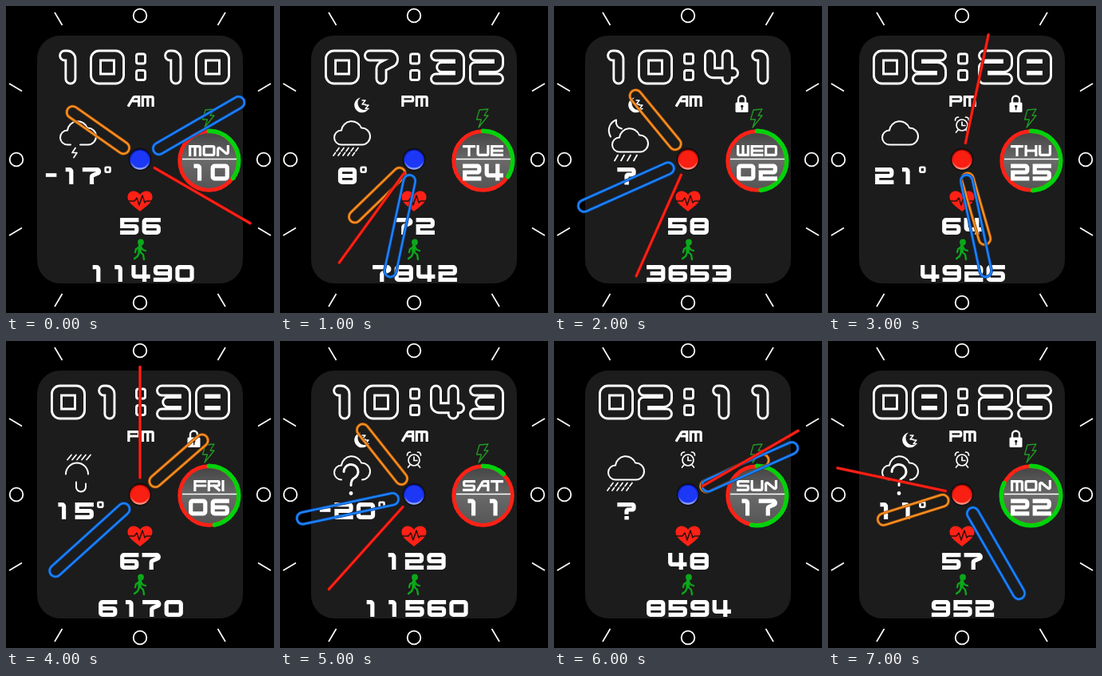
Write an HTML page with a canvas that moves like this. It is 336 px wide and 384 px high and loops after 8 s.

```html
<!DOCTYPE html>
<html lang="en">
<head>
<meta charset="utf-8">
<title>Watch face</title>
<style>
html, body { margin: 0; width: 100%; height: 100%; overflow: hidden; background: #000; }
canvas { display: block; width: 336px; height: 384px; }
</style>
</head>
<body>
<canvas id="face" width="336" height="384" role="img"></canvas>
<script>
const canvas = document.getElementById('face');
const ctx = canvas.getContext('2d');
const WHITE = '#fff', PANEL = '#1c1c1c', RED = '#ff2116', GREEN = '#00d20c';
const CX = 168, CY = 192, TAU = Math.PI * 2;

// Each state lasts one second.
const states = [
  { time: '10:10:20', half: 'AM', day: 'MON', date: '10', pulse: '56', steps: '11490', temp: '-17°', sky: 'thunder', icons: '', charge: 35 },
  { time: '07:32:36', half: 'PM', day: 'TUE', date: '24', pulse: '72', steps: '7842', temp: '8°', sky: 'rain', icons: 'moon', charge: 34 },
  { time: '10:41:34', half: 'AM', day: 'WED', date: '02', pulse: '58', steps: '3653', temp: '?', sky: 'night', icons: 'moon lock', charge: 48 },
  { time: '05:28:02', half: 'PM', day: 'THU', date: '25', pulse: '64', steps: '4926', temp: '21°', sky: 'cloud', icons: 'alarm lock', charge: 49 },
  { time: '01:38:00', half: 'PM', day: 'FRI', date: '06', pulse: '67', steps: '6170', temp: '15°', sky: 'umbrella', icons: 'lock', charge: 47 },
  { time: '10:43:37', half: 'AM', day: 'SAT', date: '11', pulse: '129', steps: '11560', temp: '-20°', sky: 'unknown', icons: 'moon alarm', charge: 12 },
  { time: '02:11:10', half: 'AM', day: 'SUN', date: '17', pulse: '48', steps: '8594', temp: '?', sky: 'rain', icons: 'alarm', charge: 53 },
  { time: '08:25:47', half: 'PM', day: 'MON', date: '22', pulse: '57', steps: '952', temp: '11°', sky: 'unknown', icons: 'moon alarm lock', charge: 82 }
];

// Strokes on a 5 x 5 lattice lettered a..y, row by row; capitals are sharp corners.
const glyphs = {
  0: 'aeyua', 1: 'bcw', 2: 'aeoKUy', 3: 'aeyu lo', 4: 'apt dx', 5: 'eAKoyu',
  6: 'eauyoK', 7: 'aejmw', 8: 'aeyua ko', 9: 'Okaeyu', '?': 'aeomr',
  A: 'ucEy mo', D: 'AeyUA', E: 'eAUy ko', F: 'eAu ko', H: 'au ey ko', I: 'cw',
  M: 'uAey cw', N: 'uaye', O: 'aeyua', P: 'uAeok', R: 'uAeok my', S: 'eakoyu',
  T: 'ae cw', U: 'auye', W: 'auYe cw', '°': 'aeyua'
};

function glyphPath(ch, x, y, w, h, weight) {
  const path = new Path2D();
  const iw = w - weight, ih = h - weight;
  const shift = ch === '1' ? iw * 0.1 : 0;
  const radius = Math.min(weight * 0.5, ih / 7);
  for (const stroke of glyphs[ch].split(' ')) {
    const pts = [...stroke].map(c => {
      const i = c.toLowerCase().charCodeAt(0) - 97;
      return {
        at: [x + weight / 2 + shift + (i % 5) / 4 * iw, y + weight / 2 + Math.floor(i / 5) / 4 * ih],
        radius: c < 'a' ? 0 : radius
      };
    });
    const closed = stroke[0] === stroke.at(-1);
    const last = pts.length - 1;
    const mid = pts[0].at.map((v, k) => (v + pts[1].at[k]) / 2);
    path.moveTo(...(closed ? mid : pts[0].at));
    for (let i = 1; i < last; i++) path.arcTo(...pts[i].at, ...pts[i + 1].at, pts[i].radius);
    if (closed) {
      path.arcTo(...pts[last].at, ...mid, pts[last].radius);
      path.closePath();
    } else {
      path.lineTo(...pts[last].at);
    }
  }
  return path;
}

function stroke(path, color, width, cap = 'round', join = 'round') {
  ctx.strokeStyle = color;
  ctx.lineWidth = width;
  ctx.lineCap = cap;
  ctx.lineJoin = join;
  ctx.stroke(typeof path === 'string' ? new Path2D(path) : path);
}

function fill(path, color) {
  ctx.fillStyle = color;
  ctx.fill(typeof path === 'string' ? new Path2D(path) : path);
}

function circle(x, y, r) {
  const path = new Path2D();
  path.arc(x, y, r, 0, TAU);
  return path;
}

// Extends butt-ended strokes to the full glyph box.
function drawGlyph(ch, x, y, w, h, weight) {
  stroke(glyphPath(ch, x, y, w, h, weight), WHITE, weight, 'square', 'miter');
}

function numberText(text, center, y) {
  const advance = ch => ch === '-' ? 18.5 : ch === '°' ? 13 : 27.5;
  let x = center - ([...text].reduce((sum, ch) => sum + advance(ch), 0) - 4.2) / 2;
  for (const ch of text) {
    if (ch === '-') stroke(`M${x} ${y + 9.5}h13.500`, WHITE, 4.6, 'butt');
    else if (ch === '°') drawGlyph(ch, x, y - 1.5, 8.5, 8.5, 2.6);
    else drawGlyph(ch, x, y, 23.3, ch === '?' ? 18 : 21, 5.2);
    if (ch === '?') fill(`M${x + 9} ${y + 17}h5.500v4.500h-5.500z`, WHITE);
    x += advance(ch);
  }
}

function label(text, center, y, h) {
  const advance = ch => ch === 'I' ? 5 : 17.5;
  let x = center - ([...text].reduce((sum, ch) => sum + advance(ch), 0) - 1.5) / 2;
  for (const ch of text) {
    drawGlyph(ch, x, y, advance(ch) - 1.5, h, 3.2);
    x += advance(ch);
  }
}

function drawTime(time) {
  const slots = [[0, 56], [1, 105], [3, 188], [4, 237]];
  for (const [i, x] of slots) {
    const shape = glyphPath(time[i], x, 54.5, 44, 44, 15);
    stroke(shape, WHITE, 15, 'round');
    stroke(shape, PANEL, 9.2, 'round');
  }
  for (const y of [60, 80.5]) {
    const dot = new Path2D();
    dot.roundRect(163.5, y, 11, 12, 2.5);
    stroke(dot, WHITE, 2.9);
  }
}

function drawBase() {
  ctx.fillStyle = '#000';
  ctx.fillRect(0, 0, 336, 384);
  const panel = new Path2D();
  panel.roundRect(39, 37, 258, 310, 29);
  fill(panel, PANEL);
  for (const [x, y] of [[168, 12], [13, 192], [323, 192], [168, 371]]) stroke(circle(x, y, 8.3), WHITE, 1.8);
  for (const sx of [-1, 1]) {
    for (const sy of [-1, 1]) {
      const line = (x1, y1, x2, y2) =>
        stroke(`M${CX + sx * x1} ${CY + sy * y1}L${CX + sx * x2} ${CY + sy * y2}`, WHITE, 1.7, 'butt');
      line(107, 184, 97.5, 168);
      line(164, 95, 148, 85.5);
    }
  }
}

function drawDay({ day, date, charge }) {
  const x = 254.5, y = 193.5;
  const shade = ctx.createLinearGradient(0, 157, 0, 230);
  shade.addColorStop(0, '#444');
  shade.addColorStop(0.5, '#696969');
  shade.addColorStop(1, '#555');
  fill(circle(x, y, 36), shade);
  stroke(circle(x, y, 36.8), RED, 4.8);
  const arc = new Path2D();
  arc.arc(x, y, 37.2, -TAU / 4, TAU * (charge / 100 - 0.25));
  stroke(arc, GREEN, 5.6);
  stroke('M221 191.500H289', WHITE, 1.5, 'butt');
  label(day, x, 174, 14);
  numberText(date, x, 197.5);
  stroke('M250 130L261 129L256 137L261 137L249 152L252.500 142L246.500 142Z', '#219a24', 1.3);
}

const CLOUD = 'M10 31a9 9 0 0 1 0-18a13 13 0 0 1 25-3a10.500 10.500 0 0 1 1 21';
const skies = {
  cloud() { stroke(CLOUD + 'z', WHITE, 2); },
  thunder() {
    stroke('M14 31H10a9 9 0 0 1 0-18a13 13 0 0 1 25-3a10.500 10.500 0 0 1 1 21H26', WHITE, 2);
    stroke('M20 35L16 41H22L18 47', WHITE, 1.7);
  },
  rain() {
    stroke(CLOUD + 'z', WHITE, 2);
    for (let i = 0; i < 5; i++) stroke(`M${7 + i * 6} 35l-3 4m-1.500 2l-2.500 3.500`, WHITE, 1.7);
  },
  night() {
    ctx.save();
    ctx.translate(5, 9);
    stroke(CLOUD + 'z', WHITE, 2);
    for (let i = 0; i < 4; i++) stroke(`M${8 + i * 8} 35l-4 7`, WHITE, 1.8);
    ctx.restore();
    stroke('M4 21C-1 12 3 3 11 0C10 6 13 10 18 11', WHITE, 2);
  },
  umbrella() {
    for (let i = 0; i < 5; i++) stroke(`M${15 + i * 6} 0l-5 6`, WHITE, 1.7);
    stroke('M8 24a14 14 0 0 1 28 0M21 34V40a6 6 0 0 0 12 0V36', WHITE, 2);
  },
  unknown() {
    stroke(CLOUD, WHITE, 2);
    stroke('M13 21a9 9 0 1 1 13 8q-4 2-4 9', WHITE, 3);
    fill(circle(22, 48, 2.4), WHITE);
  }
};

const icons = {
  moon() {
    fill('M101 114.500a9.500 9.500 0 1 0 10 14a8 8 0 0 1-10-14z', WHITE);
    stroke('M103 118h4l-4 5h4M107 124h4l-4 4.500h4', WHITE, 1.4);
  },
  lock() {
    stroke('M231 122v-5a4.500 4.500 0 0 1 9 0v5', WHITE, 2.4);
    const body = new Path2D();
    body.roundRect(227.5, 120.5, 16, 12.5, 1.5);
    fill(body, WHITE);
    fill(circle(235.7, 125.5, 1.7), PANEL);
    stroke('M235.700 126v3.500', PANEL, 1.4);
  },
  alarm() {
    stroke(circle(168, 149, 7), WHITE, 1.7);
    stroke('M168 145v4.500h4M159.500 143q0-4 4-4M176.500 143q0-4-4-4M163 155l-2.500 3M173 155l2.500 3', WHITE, 1.7);
  }
};

function drawBody({ pulse, steps }) {
  fill('M168 257C161 251 152.500 246 152.500 239C152.500 230 164 229 168 236C172 229 183.500 230 183.500 239C183.500 246 175 251 168 257Z', RED);
  stroke('M153 244h8l3-4l3 9l4-12l3 9l2-2h7', '#28100f', 1.5);
  numberText(pulse, 168.5, 265);
  const green = '#0ca81b';
  fill(circle(169, 295.5, 3.9), green);
  stroke('M168 300L167.500 307', green, 4.4);
  stroke('M168 301l-5 3l-1 4M169 301l2.500 4l3.500 1M167.500 307l4.500 4l1 6M167 308l-2 5l-4 3', green, 2.3);
  numberText(steps, 169, 324);
}

function turned(angle, draw) {
  ctx.save();
  ctx.translate(CX, CY);
  ctx.rotate(angle * Math.PI / 180);
  draw();
  ctx.restore();
}

function loopHand(angle, near, far, dark, color, light) {
  const half = 7.4;
  turned(angle, () => {
    const loop = new Path2D();
    loop.roundRect(-half, -far, half * 2, far - near, half);
    stroke(loop, dark, 3.8);
    stroke(loop, color, 2.6);
    stroke(loop, light, 0.7);
  });
}

function drawHands({ time, icons }) {
  const [h, m, s] = time.split(':').map(Number);
  loopHand(h * 30 + m / 2, 18, 110.5, '#7d3d06', '#ee8418', '#f89a35');
  loopHand(m * 6, 20, 150, '#0a3c86', '#1478ee', '#2e8cff');
  turned(s * 6, () => {
    stroke('M0-21V-159.500', '#8b0c08', 4);
    stroke('M0-21V-159.500', RED, 2.8);
  });
  const [edge, main, light] = icons.includes('lock')
    ? ['#8c0500', '#f91f12', '#ffa394'] : ['#0712a0', '#1c38f6', '#a3b4ff'];
  fill(circle(CX, CY, 14.2), 'rgba(0,0,0,.55)');
  const rim = ctx.createLinearGradient(0, CY - 13, 0, CY + 13);
  rim.addColorStop(0, edge);
  rim.addColorStop(0.6, main);
  rim.addColorStop(1, light);
  fill(circle(CX, CY, 12.8), rim);
  fill(circle(CX, CY - 0.5, 10.8), main);
}

function draw(state) {
  drawBase();
  drawTime(state.time);
  label(state.half, 169, 112, 14);
  ctx.save();
  ctx.translate(67, 142.5);
  skies[state.sky]();
  ctx.restore();
  numberText(state.temp, 91, 202);
  for (const name of state.icons.split(' ').filter(Boolean)) icons[name]();
  drawBody(state);
  drawDay(state);
  drawHands(state);
  canvas.setAttribute('aria-label', `${state.time} ${state.half}, ${state.day} ${state.date}, ${state.temp}, ${state.pulse}, ${state.steps}`);
}

let start, shown = -1;
function tick(now) {
  start ??= now;
  const index = Math.floor((now - start) / 1000) % states.length;
  if (index !== shown) draw(states[shown = index]);
  requestAnimationFrame(tick);
}
draw(states[0]);
requestAnimationFrame(tick);
</script>
</body>
</html>
```
